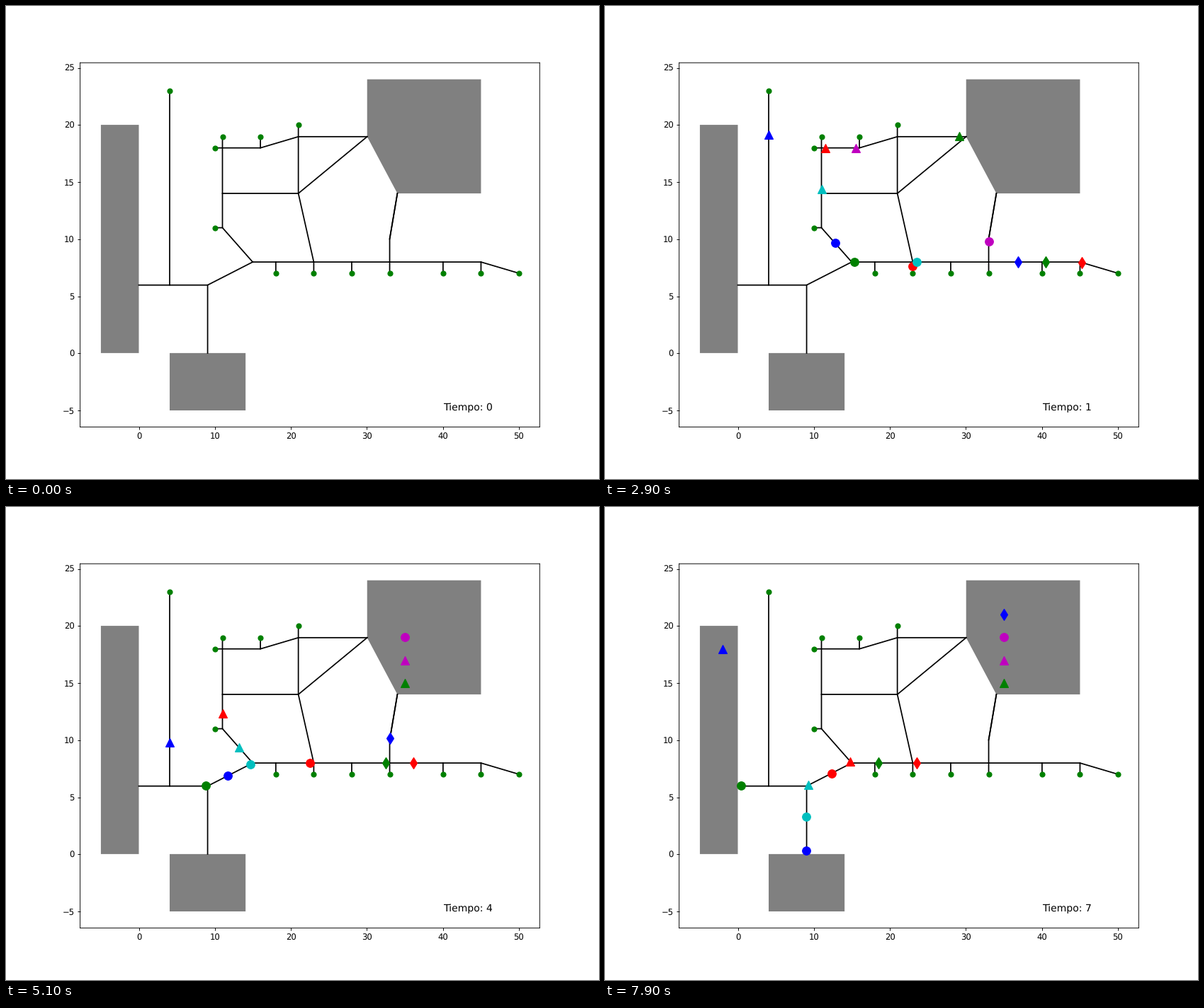
A matplotlib script for the animation above (8000 ms loop, 837 px wide and 669 px high).

```python
import math
import itertools
import numpy as np
import matplotlib.pyplot as plt
from matplotlib.animation import FuncAnimation

W, H, DPI = 837, 669, 83.7
HOLD = 10      # still frames before anything moves
TICKS = 10     # frames per time unit
UNITS = 7
XLIM, YLIM = (-7.75, 52.75), (-6.45, 25.45)
GRID = 775, 616    # cells across the axes that the map is aligned to

SHELTERS = [
    [(-5, 0), (0, 0), (0, 20), (-5, 20)],
    [(4, -5), (14, -5), (14, 0), (4, 0)],
    [(30, 24), (45, 24), (45, 14), (34, 14), (30, 19)],
]
STREET = [18, 23, 28, 33, 40, 45]

# Each road has a speed, in map units per time unit.
ROADS = [
    (5, [(15, 8)] + [(x, 8) for x in STREET] + [(50, 7)]),
    (4, [(0, 6), (4, 6), (9, 6), (15, 8)]),
    (4, [(9, 6), (9, 0)]),
    (5, [(4, 6), (4, 23)]),
    (4, [(15, 8), (11, 11), (11, 14), (11, 18), (11, 19)]),
    (4, [(10, 11), (11, 11)]),
    (10, [(10, 18), (11, 18), (16, 18), (21, 19), (30, 19)]),
    (4, [(16, 18), (16, 19)]),
    (5, [(21, 20), (21, 19), (21, 14), (23, 8)]),
    (5, [(11, 14), (21, 14), (30, 19)]),
    (4, [(33, 8), (33, 10), (34, 14)]),
    (4, [(34, 14), (33, 10)]),
] + [(4, [(x, 8), (x, 7)]) for x in STREET]

HOMES = [(4, 23), (21, 20), (16, 19), (11, 19), (10, 18), (10, 11)]
HOMES += [(x, 7) for x in STREET + [50]]

# Shelter doors, and the first parking place behind each.
DOORS = {
    "W": ((0, 6), (-2, 18)),
    "S": ((9, 0), (9, -2)),
    "E": ((30, 19), (35, 15)),
    "N": ((34, 14), (35, 15)),
}
GOALS = "WESSESWSSNNWW"    # one door per home
STYLES = [c + m for m, c in itertools.product("^od", "bgrcm")]

DEPART = {"b^": 1}                           # late starters
STALLS = {"ro": (0, 3, 1), "r^": (3, 2, 0)}  # leg, units driving, units waiting

LEGS = {}    # (from, to) -> (length, time units)
for speed, road in ROADS:
    for a, b in zip(road, road[1:]):
        size = math.dist(a, b)
        LEGS[a, b] = LEGS[b, a] = size, math.ceil(size / speed)


def route(home, goal):
    """Shortest way along the roads, as a list of junctions."""
    dist, step = {goal: 0}, {}
    for _ in LEGS:
        for (a, b), (size, _units) in LEGS.items():
            if b in dist and dist[b] + size < dist.get(a, math.inf):
                dist[a], step[a] = dist[b] + size, b
    path = [home]
    while path[-1] != goal:
        path.append(step[path[-1]])
    return path


def schedule(style, home, goal):
    """Rows of (tick, x, y) from departure to arrival."""
    clock = DEPART.get(style, 0)
    rows = [(clock * TICKS, *home)]
    path = route(home, goal)
    stalled, drive, wait = STALLS.get(style, (-1, 0, 0))
    for i, leg in enumerate(zip(path, path[1:])):
        clock += drive if i == stalled else LEGS[leg][1]
        rows.append((clock * TICKS, *leg[1]))
        if i == stalled and wait:
            clock += wait
            rows.append((clock * TICKS, *leg[1]))
    return np.array(rows)


def park(trips):
    """Fill the parking places upwards in order of arrival."""
    used, spots = {}, {}
    for i in sorted(range(len(trips)), key=lambda i: trips[i][-1, 0]):
        x, y = DOORS[GOALS[i]][1]
        n = used.get((x, y), 0)
        used[x, y] = n + 1
        spots[i] = x, y + 2 * n
    return spots


def locate(trip, spot, tick):
    times, xs, ys = trip.T
    if tick < times[0]:
        return [], []
    if tick >= times[-1]:
        return [spot[0]], [spot[1]]
    return [np.interp(tick, times, xs)], [np.interp(tick, times, ys)]


def align(points):
    """Move points to the nearest grid cell; return xs and ys."""
    out = []
    for values, (low, high), cells in zip(zip(*points), (XLIM, YLIM), GRID):
        cell = (high - low) / cells
        out.append(low + np.round((np.array(values) - low) / cell) * cell)
    return out


plt.rcParams.update({"path.snap": False, "text.hinting": "none"})
fig, ax = plt.subplots(figsize=((W + 0.001) / DPI, (H + 0.001) / DPI), dpi=DPI)

for corners in SHELTERS:
    ax.fill(*align(corners), facecolor="gray", linewidth=0)
for _, road in ROADS:
    ax.plot(*align(road), "k-", lw=1.5)
ax.plot(*align(HOMES), "go", ms=6)
ax.set(xlim=XLIM, ylim=YLIM)
label = ax.text(40, -5, "Tiempo: 0", fontsize=12)

trips = [schedule(style, home, DOORS[goal][0])
         for style, home, goal in zip(STYLES, HOMES, GOALS)]
spots = park(trips)
dots = [ax.plot([], [], style, ms=10, zorder=3)[0]
        for style, _ in zip(STYLES, trips)]


def update(frame):
    tick = frame - HOLD
    unit = tick // TICKS
    # the clock sticks for one unit in three, then catches up
    label.set_text(f"Tiempo: {unit + (unit % 3 != 1) if tick >= 0 else 0}")
    for i, dot in enumerate(dots):
        dot.set_data(*locate(trips[i], spots[i], tick))
    return [label, *dots]


anim = FuncAnimation(fig, update, frames=HOLD + UNITS * TICKS, interval=100,
                     init_func=lambda: update(0), repeat=True, repeat_delay=0)
plt.show()
```
